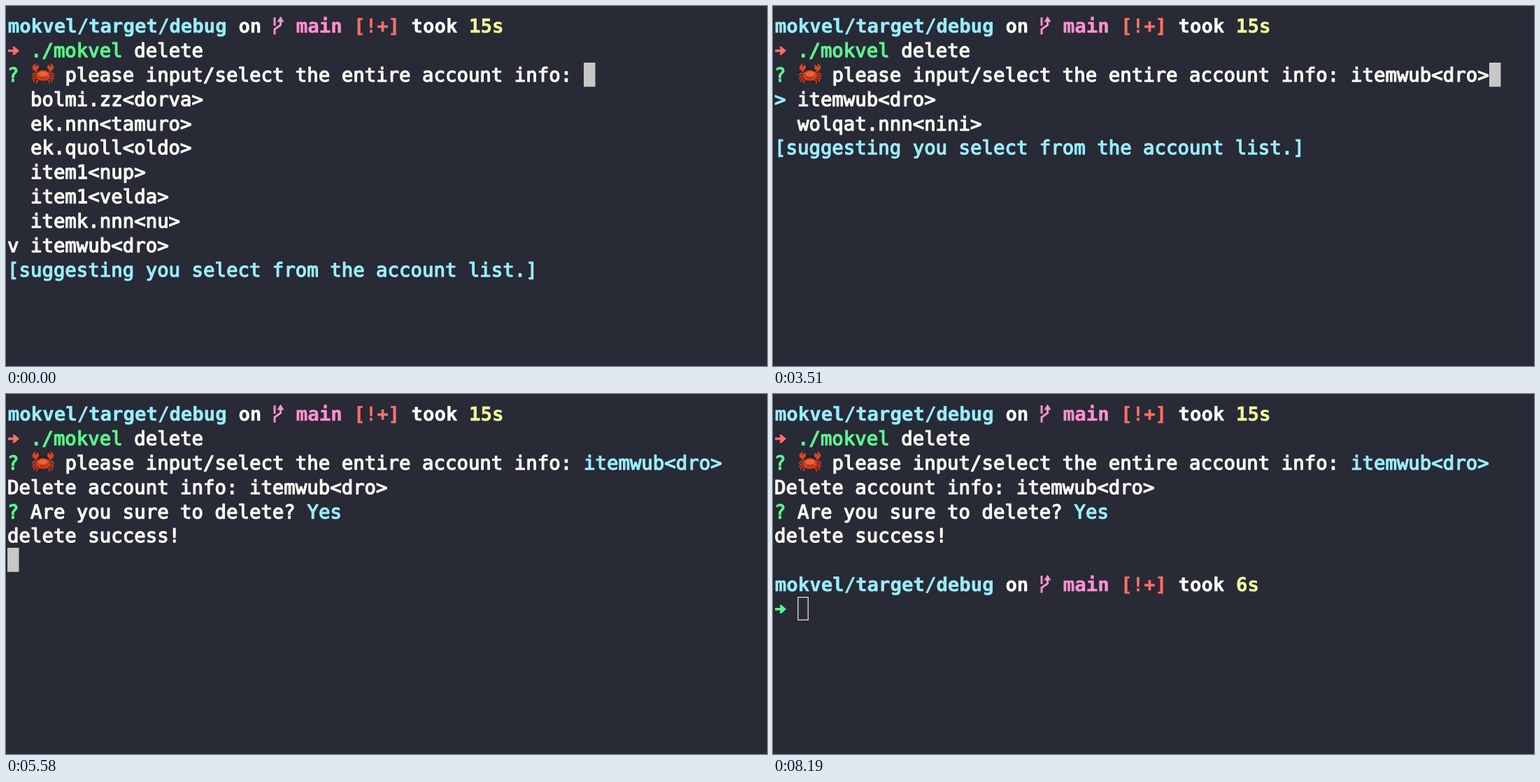
Recreate the animation shown at these times as an HTML page. Size 1088 by 515 pixels, loop 8.37 s.

```html
<!DOCTYPE html>
<html lang="en">
<head>
<meta charset="utf-8">
<title>Terminal session</title>
<style>
  html, body { margin: 0; width: 100%; height: 100%; overflow: hidden; background: #282a36; }
  svg { display: block; width: 1088px; height: 515px; }
  text {
    font: 27.373px "DejaVu Sans Mono", monospace;
    white-space: pre;
    text-rendering: geometricPrecision;
    stroke-width: 1.3px;
    stroke-linejoin: round;
  }
  text.bold { font-weight: 700; stroke-width: .4px; }
</style>
</head>
<body>
<svg id="stage" viewBox="0 0 1088 515" xmlns="http://www.w3.org/2000/svg"></svg>
<script>
const LOOP = 8370;
const LEFT = 2, TOP = 11.3, CELL = 16.48, LINE = 34.83, BASE = 26.9;
const WHITE = '#f8f8f2', CYAN = '#9aedfe', GREEN = '#5af78e', RED = '#ff6e67',
      PINK = '#ff92d0', YELLOW = '#f4f99d', BLOCK = '#c7c7c7';
const NS = 'http://www.w3.org/2000/svg';
const stage = document.getElementById('stage');
const layers = [];

const colX = col => LEFT + col * CELL;
const rowY = row => TOP + row * LINE;

function add(parent, tag, attrs = {}) {
  const el = document.createElementNS(NS, tag);
  for (const key in attrs) el.setAttribute(key, attrs[key]);
  parent.appendChild(el);
  return el;
}

function layer(from, to) {
  const el = add(stage, 'g');
  layers.push({ el, from, to });
  return el;
}

function write(g, row, col, str, fill = WHITE, bold = false) {
  const x = colX(col) + (bold ? 0.8 : 0);
  const el = add(g, 'text', { x, y: rowY(row) + BASE, fill, stroke: fill });
  if (bold) el.setAttribute('class', 'bold');
  el.textContent = str;
}

function block(g, row, col) {
  add(g, 'rect', { x: Math.round(colX(col)), y: Math.round(rowY(row)), width: 16.5, height: 34.5, fill: BLOCK });
}

function arrow(g, row, fill) {
  add(g, 'path', {
    d: 'M1 16H8.6L7.4 11.8H10L17 17.8L10 23.8H7.4L8.6 19.6H1Z',
    transform: `translate(${LEFT} ${rowY(row)})`, fill
  });
}

function branch(g, row) {
  const box = add(g, 'g', { transform: `translate(${colX(23)} ${rowY(row)})` });
  add(box, 'path', { d: 'M3 5V17M3 29.5V22L11.5 16V10', fill: 'none', stroke: PINK, 'stroke-width': 3 });
  add(box, 'path', { d: 'M11.5 3.5L16.5 11.5H6.5Z', fill: PINK });
}

function prompt(g, row, secs) {
  write(g, row, 0, 'mokvel/target/debug', CYAN, true);
  write(g, row, 20, 'on', '#fff', true);
  branch(g, row);
  write(g, row, 25, 'main', PINK, true);
  write(g, row, 30, '[!+]', RED, true);
  write(g, row, 35, 'took', '#fff', true);
  write(g, row, 40, secs, YELLOW, true);
}

function crab(g) {
  const box = add(g, 'g', { transform: 'translate(53 97)', 'stroke-linecap': 'round' });
  for (const side of [1, -1]) {
    const half = add(box, 'g', { transform: `scale(${side} 1)` });
    add(half, 'path', {
      d: 'M8 1L13 -1L15.5 2M8 4L13 3L15 7M7 6L12 7L13 11M5 8L9 10L9 13M8 -2L12 -5',
      fill: 'none', stroke: '#c93a18', 'stroke-width': 1.9, 'stroke-linejoin': 'round'
    });
    add(half, 'path', { d: 'M11 -4C17 -6 17 -12 10 -15L12 -10L7 -13C5 -9 7 -5 11 -4Z', fill: '#dd4420' });
    add(half, 'path', { d: 'M3 -3V-7', stroke: '#c93a18', 'stroke-width': 1.6 });
  }
  add(box, 'ellipse', { cy: 2.5, rx: 9.6, ry: 7.6, fill: '#d63f1c' });
  add(box, 'ellipse', { cy: 0, rx: 6.8, ry: 3.6, fill: '#ee6335' });
  for (const x of [-3, 3]) add(box, 'circle', { cx: x, cy: -7, r: 1.7, fill: '#2b1714' });
  add(box, 'path', { d: 'M-4 5.5Q0 8 4 5.5', fill: 'none', stroke: '#9d2b12', 'stroke-width': 1.2 });
}

const PICK = 'itemwub<dro>', MATCH = 'wolqat.nnn<nini>';
const hint = (g, row, str = '[suggesting you select from the account list.]') => write(g, row, 0, str, CYAN);

// Always visible
const base = layer(0, LOOP);
prompt(base, 0, '15s');
arrow(base, 1, RED);
write(base, 1, 2, './mokvel', GREEN);
write(base, 1, 11, 'delete');
write(base, 2, 0, '?', GREEN);
crab(base);
write(base, 2, 5, 'please input/select the entire account info:');

// Full account list
const list = layer(0, 1980);
block(list, 2, 50);
['bolmi.zz<dorva>', 'ek.nnn<tamuro>', 'ek.quoll<oldo>', 'item1<nup>',
 'item1<velda>', 'itemk.nnn<nu>', PICK].forEach((name, i) => write(list, 3 + i, 2, name));
write(list, 9, 0, 'v');
hint(list, 10);

// Filtered list
const matches = layer(1980, 4230);
write(matches, 3, 2, PICK);
write(matches, 4, 2, MATCH);
hint(matches, 5);

const typed = layer(1980, 3510);
write(typed, 2, 50, 'w');
block(typed, 2, 51);

const picked = layer(3510, 4230);
write(picked, 2, 50, PICK);
block(picked, 2, 62);
write(picked, 3, 0, '>', CYAN);

// Confirmation
const confirmed = layer(4230, LOOP);
write(confirmed, 2, 50, PICK, CYAN);
write(confirmed, 3, 0, 'Delete account info: ' + PICK);
write(confirmed, 4, 0, '?', GREEN);
write(confirmed, 4, 2, 'Are you sure to delete?');

const ask = layer(4230, 5580);
write(ask, 4, 26, '(Y/n)');
block(ask, 4, 32);
hint(ask, 5, '[press Enter/y/yes delete, press n/no to cancel.]');

const done = layer(5580, LOOP);
write(done, 4, 26, 'Yes', CYAN);
write(done, 5, 0, 'delete success!');

block(layer(5580, 5940), 6, 0);

// Back at the shell
const shell = layer(5940, LOOP);
prompt(shell, 7, '6s');
arrow(shell, 8, GREEN);
block(layer(5940, 7290), 8, 2);
add(layer(7290, LOOP), 'rect', {
  x: 35.75, y: 290.75, width: 14.5, height: 32.5, fill: 'none', stroke: BLOCK, 'stroke-width': 1.5
});

// Mouse pointer
const mouse = layer(6120, 6660);
const beam = 'M-5 -12Q0 -12 0 -8Q0 -12 5 -12M0 -8V8M-5 12Q0 12 0 8Q0 12 5 12M-3 0H3';
for (const [stroke, width] of [['#fff', 5.4], ['#111', 2]])
  add(mouse, 'path', { d: beam, fill: 'none', stroke, 'stroke-width': width, 'stroke-linecap': 'square' });

const path = [[6120, 330, 510], [6300, 290, 260], [6390, 283, 229], [6480, 283, 229], [6660, 310, 525]];

function moveMouse(t) {
  const i = path.findIndex(p => t < p[0]);
  if (i < 1) return;
  const [t0, x0, y0] = path[i - 1], [t1, x1, y1] = path[i];
  const k = (t - t0) / (t1 - t0);
  mouse.setAttribute('transform', `translate(${x0 + (x1 - x0) * k} ${y0 + (y1 - y0) * k})`);
}

const start = performance.now();
function draw(now) {
  const t = Math.max(0, now - start) % LOOP;
  for (const { el, from, to } of layers)
    el.style.display = t >= from && t < to ? '' : 'none';
  moveMouse(t);
  requestAnimationFrame(draw);
}
draw(start);
</script>
</body>
</html>
```
